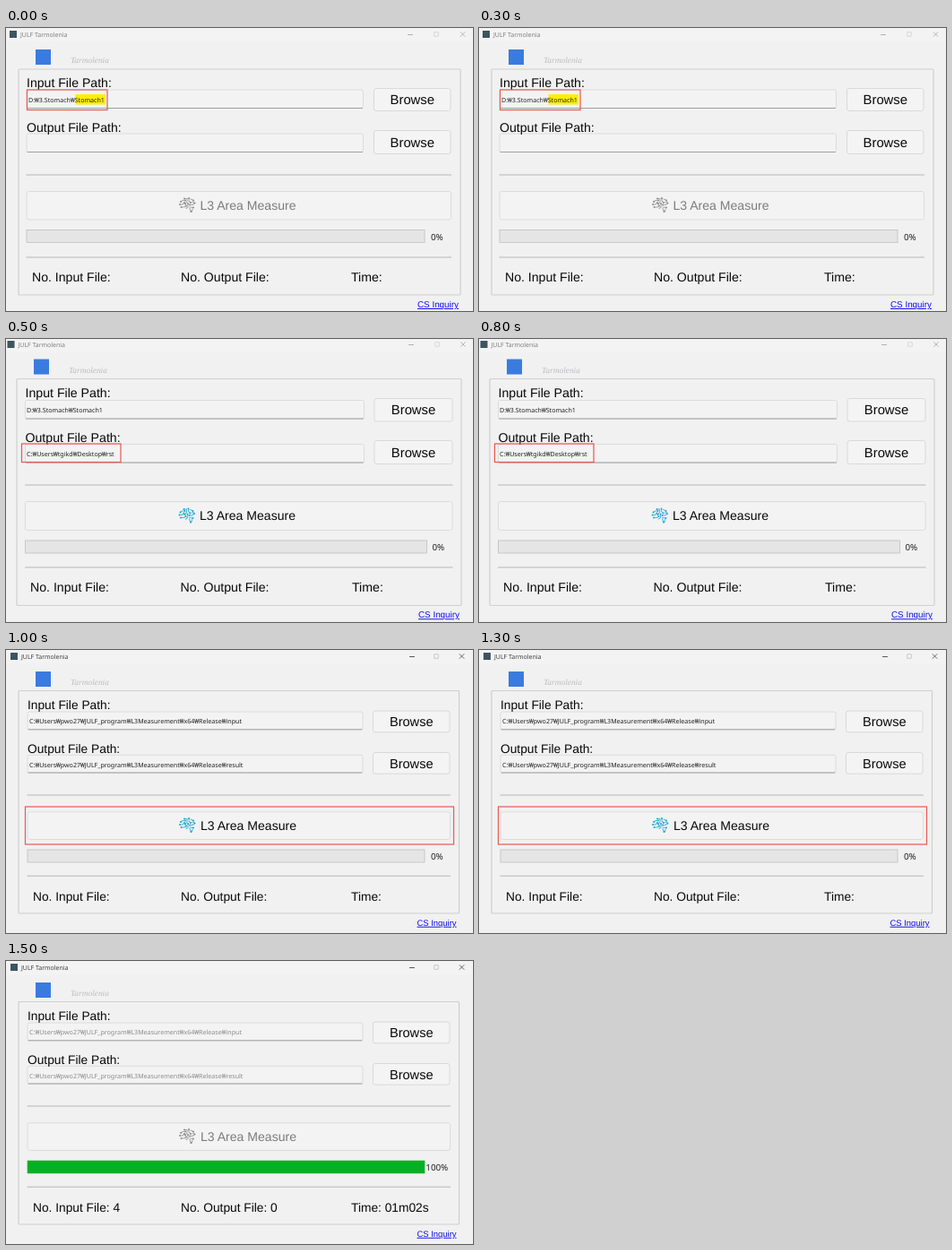
Write an HTML page that moves like this. It is 521x316 px and loops after 2 s.

```html
<!DOCTYPE html>
<html lang="en">
<head>
<meta charset="utf-8">
<title>JULF Tarmolenia</title>
<style>
html, body { margin: 0; width: 100%; height: 100%; overflow: hidden; background: #f1f1f1; }
svg { display: block; width: 521px; height: 316px; }
text { white-space: pre; text-rendering: geometricPrecision; }
.ui { font-family: "Liberation Sans", Arial, sans-serif; }
.path { font-family: "Noto Sans", "Noto Sans CJK KR", sans-serif; }
.bar { font-family: "Open Sans", "Noto Sans", sans-serif; }
.script { font-family: "Liberation Serif", serif; font-style: italic; }
</style>
</head>
<body>
<svg id="stage" viewBox="0 0 521 316"></svg>
<script>
const stage = document.getElementById('stage');
const STEP = 500;

// Three window captures differ slightly in offset and scale.
const first = {
  title: [16, 10], icon: [4, 3], ctl: [451, 480, 509.5, 7], logo: [33, 24], sub: [72, 39],
  box: [14, 46, 507, 298], left: 23, right: 496.5, fieldEnd: 398.5,
  labels: [66, 115.5], fields: [[69, 89.5], [118, 138.5]], paths: [25, 83, 132],
  btnX: [410.5, 496], btns: [[67.5, 92.5], [114.5, 140.5]], btnText: [85.3, 132.9],
  rules: [164, 256], main: [182.5, 214], mainText: [216.5, 203], brain: [193, 189],
  bar: [467, 225.5, 239.5], pct: [474, 237], stats: [29, 195, 385, 283],
  link: [459, 312], size: 14.1, btnSize: 14.8, linkSize: 9.85
};
const second = {
  title: [13.5, 9], icon: [1.5, 2], ctl: [452, 481, 510, 6], logo: [31, 22.5], sub: [70, 37.5],
  box: [12, 44.5, 508, 297.5], left: 21.5, right: 498, fieldEnd: 399.5,
  labels: [65.3, 114.5], fields: [[68.5, 89], [117.5, 138]], paths: [23, 82, 131.3],
  btnX: [411, 498], btns: [[66.5, 92], [113.5, 139.5]], btnText: [84.4, 132],
  rules: [163, 255], main: [181.5, 213.5], mainText: [216, 202.4], brain: [192.5, 188.5],
  bar: [469.5, 225, 239], pct: [475.5, 236], stats: [27, 194.5, 386, 282.3],
  link: [460, 311.3], size: 14.15, btnSize: 14.8, linkSize: 9.85
};
const third = {
  title: [17, 10], icon: [5, 3], ctl: [453, 480, 508.5, 7], logo: [33, 24], sub: [72, 38.8],
  box: [14, 45.5, 505.5, 294], left: 24, right: 495.5, fieldEnd: 398,
  labels: [66, 114.8], fields: [[69, 88.8], [117.3, 137]], paths: [26, 82.2, 130.6],
  btnX: [409.5, 495], btns: [[68, 91.8], [114.5, 138.2]], btnText: [85, 131.8],
  rules: [162, 252.3], main: [180.8, 211.5], mainText: [217, 201.4], brain: [193, 187],
  bar: [467, 223, 237], pct: [474, 234.4], stats: [30, 195, 385, 279.8],
  link: [458.5, 307.8], size: 13.75, btnSize: 14.6, linkSize: 9.45
};

const stomach = 'D:₩3.Stomach₩Stomach1';
const release = 'C:₩Users₩pwo27₩JULF_program₩L3Measurement₩x64₩Release₩';
const scenes = [
  { at: first, paths: [stomach, ''], mark: [23.5, 69, 113, 91.5], glow: [77.5, 74, 111, 85.5], pale: true },
  { at: second, paths: [stomach, 'C:₩Users₩tgikd₩Desktop₩rst'], mark: [17.5, 117, 128, 137.5], ready: true, pale: true },
  { at: third, paths: [release + 'input', release + 'result'], mark: [21.5, 175, 499.5, 217], ready: true },
  { at: third, paths: [release + 'input', release + 'result'], done: true }
];

function rect(x1, y1, x2, y2, fill, stroke = 'none', r = 0, w = 1) {
  return `<rect x="${x1}" y="${y1}" width="${x2 - x1}" height="${y2 - y1}" rx="${r}" fill="${fill}" stroke="${stroke}" stroke-width="${w}"/>`;
}
function line(d, color, w = 1) {
  return `<path d="${d}" fill="none" stroke="${color}" stroke-width="${w}" stroke-linecap="round"/>`;
}
function text(str, x, y, size, kind = 'ui', fill = '#080808', extra = '') {
  return `<text class="${kind}" x="${x}" y="${y}" font-size="${size}" fill="${fill}" ${extra}>${str}</text>`;
}

// Circuit-like folds ending in nodes.
function brain([x, y], color, dark) {
  const folds = 'M1 8L4 8L6 6M2 5L4 3.5L7 3.5M6 1.5L9 1.5L9 5L7 7.5M11 1L11 4L13 6M13 2L16 3.5'
    + 'M2.5 11L6 11L8 9.5M10 7L10 11L8 12.5M12 8.5L15 8.5L17.5 6.5M15 5.5L17 5M12 11L16 11.5M12 12.5L13.5 16.5M15 13L14.5 16';
  const dots = [[1, 8], [6, 6], [2, 5], [7, 3.5], [6, 1.5], [7, 7.5], [11, 1], [13, 6], [16, 3.5],
    [2.5, 11], [8, 9.5], [10, 7], [12, 8.5], [17.5, 6.5], [16, 11.5], [13.5, 16]];
  return `<g transform="translate(${x} ${y})">` + line(folds, color, 1.1)
    + dots.map(([a, b]) => `<circle cx="${a}" cy="${b}" r=".95" fill="${dark}"/>`).join('') + '</g>';
}

function header(p, pale) {
  const [a, b, c, y] = p.ctl, ink = pale ? '#a8a8a8' : '#444';
  const [ix, iy] = p.icon, [lx, ly] = p.logo;
  return rect(0, 0, 521, 15, '#f3f3f4')
    + rect(ix, iy, ix + 8, iy + 8, '#3d5560')
    + text('JULF Tarmolenia', ...p.title, 7, 'bar', pale ? '#777' : '#333')
    + line(`M${a - 2.5} ${y + .5}h5`, ink, .9)
    + rect(b - 2.3, y - 2.3, b + 2.3, y + 2.3, 'none', pale ? '#d2d2d2' : '#bcbcbc', .3, .8)
    + line(`M${c - 2.4} ${y - 2.4}l4.8 4.8m0 -4.8l-4.8 4.8`, ink, .8)
    + rect(lx, ly, lx + 17, ly + 17, '#3a7be0')
    + text('Tarmolenia', ...p.sub, 9.4, 'script', '#bcbcc0');
}

function field(p, i) {
  const [top, bottom] = p.fields[i];
  return rect(p.left, top, p.fieldEnd, bottom, '#f3f3f3', '#dcdcdc', 2)
    + line(`M${p.left + 1} ${bottom}H${p.fieldEnd - 1}`, '#a0a0a0');
}

function button(p, i) {
  const [x1, x2] = p.btnX, [top, bottom] = p.btns[i];
  return rect(x1, top, x2, bottom, '#f4f4f4', '#d9d9d9', 2.5)
    + text('Browse', (x1 + x2) / 2, p.btnText[i], p.btnSize, 'ui', '#080808', 'text-anchor="middle"');
}

function draw(s) {
  const p = s.at, off = '#7c7c7c';
  const [barEnd, barTop, barBottom] = p.bar, [sx, sy, sz, base] = p.stats;
  let out = rect(0, 0, 521, 316, '#f1f1f1') + header(p, s.pale)
    + rect(...p.box, 'none', '#cfcfcf', 1, 1.2);

  ['Input File Path:', 'Output File Path:'].forEach((label, i) => {
    out += field(p, i) + text(label, p.left, p.labels[i], p.size) + button(p, i);
  });
  if (s.glow) out += rect(...s.glow, '#ffee08');
  s.paths.forEach((str, i) => {
    out += text(str, p.paths[0], p.paths[i + 1], 7.1, 'path', s.done ? '#8c8c8c' : '#222');
  });

  p.rules.forEach(y => { out += line(`M${p.left} ${y}H${p.right}`, '#b8b8b8', 1.1); });
  out += rect(p.left, p.main[0], p.right, p.main[1], '#f3f3f3', '#dcdcdc', 2.5)
    + brain(p.brain, s.ready ? '#45bfe3' : '#a8a8a8', s.ready ? '#2b9ccb' : '#8c8c8c')
    + text('L3 Area Measure', ...p.mainText, 14.05, 'ui', s.ready ? '#080808' : off);

  out += s.done
    ? rect(p.left, barTop, barEnd, barBottom, '#06b025', '#06b025', 0, .5)
    : rect(p.left, barTop, barEnd, barBottom, '#e5e5e5', '#c8c8c8');
  out += text(s.done ? '100%' : '0%', s.done ? 468.3 : p.pct[0], p.pct[1], 9.8, 'path', '#222');

  out += text('No. Input File:' + (s.done ? ' 4' : ''), sx, base, p.size)
    + text('No. Output File:' + (s.done ? ' 0' : ''), sy, base, p.size)
    + text('Time:' + (s.done ? ' 01m02s' : ''), sz, base, p.size)
    + text('CS Inquiry', ...p.link, p.linkSize, 'ui', '#1010f0', 'text-decoration="underline"');
  if (s.mark) out += rect(...s.mark, 'none', '#ea5850', 0, 1.2);
  stage.innerHTML = out;
}

let shown = -1;
const start = performance.now();
function tick() {
  const i = Math.floor((performance.now() - start) / STEP) % scenes.length;
  if (i !== shown) draw(scenes[shown = i]);
  requestAnimationFrame(tick);
}
tick();
</script>
</body>
</html>
```
